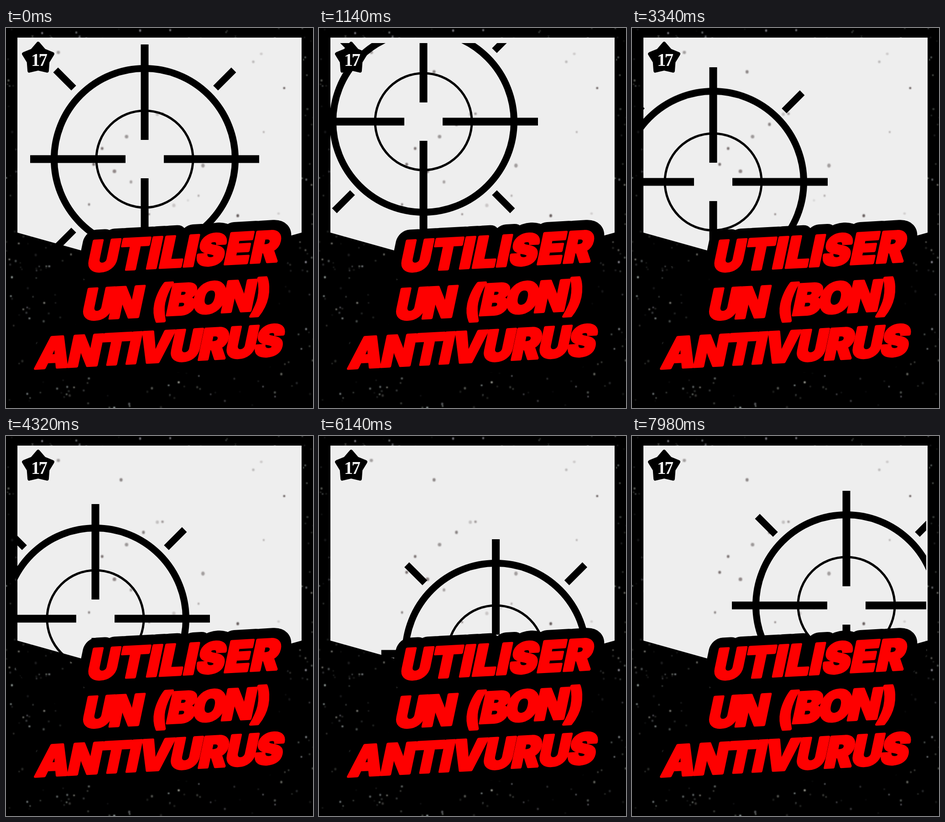
An HTML page that plays this animation: 673 by 832 pixels, repeating every 8 s.

```html
<!DOCTYPE html>
<html lang="fr">
<head>
<meta charset="utf-8">
<title>Utiliser un (bon) antivurus</title>
<style>
  html, body { margin: 0; width: 100%; height: 100%; overflow: hidden; background: #000; }
  svg { display: block; width: 100%; height: 100%; }
  .title { font: 900 91px Inter, sans-serif; text-anchor: middle; word-spacing: 16px; stroke-linejoin: round; }
  .outline { fill: #000; stroke: #000; stroke-width: 49; }
  .face { fill: #fe0000; stroke: #fe0000; stroke-width: 6; }
  .number { font: bold 39px "Liberation Serif", serif; letter-spacing: -3px; fill: #f4f4f4; text-anchor: middle; }
</style>
</head>
<body>
<svg viewBox="0 0 673 832">
  <defs>
    <filter id="soft"><feGaussianBlur stdDeviation="0.8"/></filter>
    <clipPath id="window"><rect x="22" y="33" width="623" height="667"/></clipPath>
  </defs>
  <rect width="673" height="832"/>
  <g id="stars" filter="url(#soft)"></g>
  <path d="M25 21H648V448L336 535L25 448Z" fill="#eee"/>
  <g id="dust" filter="url(#soft)"></g>
  <g clip-path="url(#window)">
    <g id="sight" fill="none" stroke="#000">
      <circle r="198.5" stroke-width="15"/>
      <circle r="106" stroke-width="5"/>
    </g>
  </g>
  <path id="badge" stroke="#000" stroke-width="8" stroke-linejoin="round"/>
  <text class="number" x="71.5" y="82.5">17</text>
  <g id="outline" class="title outline"></g>
  <g id="face" class="title face"></g>
</svg>
<script>
const $ = id => document.getElementById(id);

function add(parent, tag, attrs, text = '') {
  const el = document.createElementNS('http://www.w3.org/2000/svg', tag);
  for (const key in attrs) el.setAttribute(key, attrs[key]);
  el.textContent = text;
  parent.append(el);
}

let seed = 17;
const random = () => (seed = (seed * 16807) % 2147483647) / 2147483647;
const between = (low, high) => low + (high - low) * random();

function scatter(parent, count, [left, top, right, bottom], [small, large], hue, light) {
  for (let i = 0; i < count; i++) {
    const size = between(small, large);
    add(parent, 'ellipse', {
      cx: between(left, right), cy: between(top, bottom),
      rx: size, ry: size * between(0.8, 1.3),
      fill: `hsl(${hue()} 12% ${light}%)`,
      opacity: 0.12 + 0.7 * random() ** 1.5
    });
  }
}
scatter($('stars'), 720, [0, 0, 673, 832], [1, 2.4], () => between(40, 260), 78);
scatter($('dust'), 22, [60, 28, 635, 425], [2, 4], () => 0, 20);

// Sight: four bars, and four ticks on the diagonals
for (let k = 0; k < 8; k++) {
  const [from, to, width] = k % 2 ? [220, 276, 15] : [42, 251, 17];
  add($('sight'), 'path', { d: `M${from} 0H${to}`, 'stroke-width': width, transform: `rotate(${45 * k})` });
}

const starPoint = (_, k) => {
  const radius = k % 2 ? 22 : 33, angle = k * Math.PI / 5;
  return [70.5 + radius * Math.sin(angle), 67 - radius * Math.cos(angle)];
};
$('badge').setAttribute('d', 'M' + Array.from({ length: 10 }, starPoint).join('L') + 'Z');

// Text, centre x, baseline y, letter spacing
const lines = [
  ['UTILISER', 385, 522, 1.4],
  ['UN (BON)', 365, 628, -5.5],
  ['ANTIVURUS', 331, 731, -2]
];
for (const layer of ['outline', 'face'])
  for (const [text, x, y, spacing] of lines)
    add($(layer), 'text', {
      transform: `translate(${x} ${y}) rotate(-3.1) skewX(-15)`,
      style: `letter-spacing:${spacing}px`
    }, text);

// Key points of the sight's smooth path: step, x, y
const path = [
  [0, 304, 287], [25, 229, 205], [50, 201, 277], [92, 196, 400],
  [115, 310, 477], [149, 453, 441], [171, 470, 371]
];
const last = path.length - 1;
const gap = k => path[k + 1][0] - path[k][0];
const rate = (k, axis) => (path[k + 1][axis] - path[k][axis]) / gap(k);

function slope(k, axis) {
  if (k === 0) return 1.5 * rate(0, axis) - 0.5 * slope(1, axis);
  if (k === last) return 1.5 * rate(k - 1, axis) - 0.5 * slope(k - 1, axis);
  return (rate(k - 1, axis) * gap(k) + rate(k, axis) * gap(k - 1)) / (gap(k - 1) + gap(k));
}

function along(step, axis) {
  let k = 0;
  while (k < last - 1 && step >= path[k + 1][0]) k++;
  const span = gap(k), u = (step - path[k][0]) / span, v = 1 - u;
  return v * v * ((1 + 2 * u) * path[k][axis] + u * span * slope(k, axis))
       + u * u * ((1 + 2 * v) * path[k + 1][axis] - v * span * slope(k + 1, axis));
}

// Three uneven steps every 140 ms: at 0, 20 and 120
function stepAt(time) {
  const phase = time % 140;
  return 3 * Math.floor(time / 140) + (phase >= 20) + (phase >= 120);
}

const start = performance.now();
function draw(now) {
  const step = stepAt(Math.max(0, now - start) % 8000);
  $('sight').setAttribute('transform', `translate(${along(step, 1)} ${along(step, 2)})`);
  requestAnimationFrame(draw);
}
draw(start);
</script>
</body>
</html>
```
